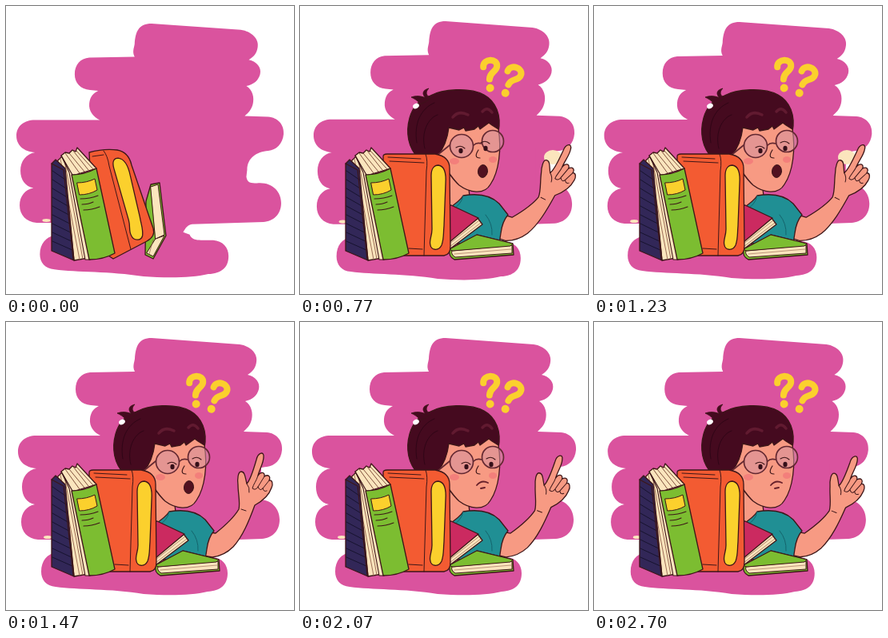
Animation, 360 px wide and 360 px high, one loop 2730 ms. Source, as an HTML page with a canvas:

```html
<!DOCTYPE html>
<html lang="en">
<head>
<meta charset="utf-8">
<title>Student with questions</title>
<style>
html, body { margin: 0; width: 100%; height: 100%; overflow: hidden; background: #fff; }
canvas { display: block; width: 360px; height: 360px; }
</style>
</head>
<body>
<canvas id="stage"></canvas>
<script>
const LOOP = 2730;
const canvas = document.getElementById('stage');
const ctx = canvas.getContext('2d');
const ratio = window.devicePixelRatio || 1;
canvas.width = canvas.height = 360 * ratio;

const INK = '#3d1618', PINK = '#da539e', CREAM = '#fbe5bd', SKIN = '#f79a83';
const GREEN = '#7cbd31', YELLOW = '#fbd02d', HAIR = '#450a1f', PAGE = '#91614c';

const paths = {};
function path(d) {
  return paths[d] || (paths[d] = new Path2D(d));
}
function shape(d, fill, width = 1.3, ink = INK) {
  ctx.fillStyle = fill;
  ctx.fill(path(d));
  if (width) line(d, width, ink);
}
function line(d, width = 1, ink = INK) {
  ctx.lineWidth = width;
  ctx.strokeStyle = ink;
  ctx.stroke(path(d));
}
function oval(x, y, rx, ry, fill, width = 0, turn = 0, ink = INK) {
  ctx.beginPath();
  ctx.ellipse(x, y, rx, ry, turn, 0, Math.PI * 2);
  ctx.fillStyle = fill;
  ctx.fill();
  if (width) {
    ctx.lineWidth = width;
    ctx.strokeStyle = ink;
    ctx.stroke();
  }
}
function group(draw) {
  ctx.save();
  draw();
  ctx.restore();
}
function pivot(x, y, degrees, scale = 1) {
  ctx.translate(x, y);
  ctx.rotate(degrees * Math.PI / 180);
  ctx.scale(scale, scale);
  ctx.translate(-x, -y);
}
// Eased value at time t from [time, value] pairs
function track(t, keys) {
  if (t <= keys[0][0]) return keys[0][1];
  for (let i = 1; i < keys.length; i++) {
    const [t0, a] = keys[i - 1], [t1, b] = keys[i];
    if (t < t1) {
      const k = (t - t0) / (t1 - t0);
      return a + (b - a) * k * k * (3 - 2 * k);
    }
  }
  return keys[keys.length - 1][1];
}

const blob = 'M182 20L292 28C306 30 315 40 313 50C312 58 308 62 302 66C312 68 318 76 316 84' +
  'C314 92 308 97 299 99C307 104 309 114 307 122C305 130 301 133 297 137L326 138' +
  'C338 139 346 148 345 160C344 172 336 180 326 181C312 182 300 190 300 205L299 214' +
  'C300 222 305 222 312 222C330 220 342 232 342 247C342 262 332 270 320 271L232 274' +
  'C226 275 224 279 221 284L229 287C231 293 237 294 243 294L258 294C270 295 277 303 277 314' +
  'C277 329 268 336 252 337C232 342 200 342 172 340C130 333 90 335 62 331C50 330 44 322 44 312' +
  'C44 298 52 290 62 288L60 272L40 272C27 271 19 262 19 250C19 238 26 230 36 228C26 226 20 218 20 206' +
  'C20 194 27 185 38 183C24 182 15 174 15 162C15 150 24 142 38 142L118 142' +
  'C110 138 104 131 105 121C106 112 110 108 116 105L106 104C94 103 87 95 87 84' +
  'C87 72 94 64 105 63L161 62C158 56 160 52 161 46C162 30 166 20 182 20Z';

function drawBlob(t) {
  const sx = track(t, [[0, 1.012], [370, .973], [770, .988], [900, 1.012], [1030, 1], [1290, 1.016],
    [1470, 1], [1850, 1.01], [2070, 1], [2400, 1.008], [2700, .987]]);
  const sy = track(t, [[0, .988], [370, .98], [770, 1.007], [1030, 1]]);
  group(() => {
    ctx.translate(180, 180);
    ctx.scale(sx, sy);
    ctx.translate(-180, -180);
    shape(blob, PINK, 0);
    oval(52, 269, 5, 2, CREAM);
    if (t > 500) {
      ctx.fillStyle = PINK;
      ctx.fillRect(296, 178, t > 1280 ? 23 : 17, 46);
    }
  });
  if (t > 200 && t < 1280) {
    const k = track(t, [[370, 0], [650, 1]]);
    oval(316, 201 - 12 * k, 18 - 7 * k, 21 - 12 * k, CREAM);
  }
}

function mark(x, y, turn) {
  group(() => {
    ctx.translate(x, y);
    ctx.rotate(turn);
    line('M-8 -9C-9 -20 10 -21 9 -10C8 -3 0 -3 0 6', 8, YELLOW);
    oval(1, 17, 5, 5, YELLOW);
  });
}
function drawMarks(t) {
  if (t < 250) return;
  group(() => {
    ctx.globalAlpha = track(t, [[250, 0], [370, .72], [520, 1]]);
    pivot(246, 113, track(t, [[250, 95], [370, 67], [600, 0]]), track(t, [[370, 1.1], [600, 1]]));
    mark(237, 85.5, .02);
    mark(263, 93, .44);
  });
}

function drawArm(t) {
  group(() => {
    pivot(262, 285, track(t, [[100, 14], [370, 10.5], [770, 8.4], [1030, 9.5], [1250, 8.4],
      [1470, 0], [2070, 2.9], [2700, 3.6]]));
    shape('M248 262L262 264C272 256 284 246 291 234C293 226 290 214 290 204C289 196 290 187 294 187' +
      'C299 187 299 195 301 202C305 198 309 186 313 172C315 163 323 161 322 169C322 176 317 184 315 192' +
      'C318 187 324 187 323 193C328 190 331 193 329 198C333 197 334 203 332 207C329 216 322 223 311 229' +
      'C304 248 296 268 284 281C276 289 266 293 258 294L246 292Z', SKIN);
    line('M315 192C313 199 309 203 308 208Q312 211 315 206L323 193M315 206Q317 212 321 208L329 198' +
      'M321 208Q322 213 326 211M301 202Q305 207 304 213M294 234L300 236', 1);
  });
}

function drawEyes(t) {
  const look = track(t, [[800, -7], [1000, 0]]);
  for (const [x, y, r, px] of [[202, 175, 14.5, 208], [241, 169, 13.5, 239]]) {
    oval(x, y, r, r, 'rgba(214,146,158,.55)', 1.7, 0, '#632831');
    oval(px + look, 181 - (x > 220 ? 3 : 0), 2.6, 3.2, '#351019');
    line(`M${px + look - 6} ${y + 2}Q${px + look} ${y - 2} ${px + look + 5} ${y + 3}`, 1.1);
  }
  line('M217 174Q221 170 227 172M187 174L171 187', 1.7, '#632831');
}

function drawBoy(t) {
  if (t < 60) return;
  group(() => {
    pivot(200, 297, 0, track(t, [[60, .15], [320, 1]]));
    drawArm(t);
    shape('M185 210L188 262L214 252L210 222Z', SKIN);
    shape('M184 254C192 249 200 244 204 237C222 234 238 236 249 247L260 261C254 268 252 276 251 284' +
      'L249 297L185 297Z', '#208f94');
    line('M204 237Q202 249 188 256M232 261Q241 272 240 286', 1, '#14646c');
    shape('M148 190C135 177 132 158 137 140C141 125 151 116 163 112C178 104 211 101 230 111' +
      'C245 119 252 137 248 157L235 176L180 196Z', HAIR);
    shape('M157 115C151 112 145 112 139 114C145 117 148 119 150 123C156 120 161 118 163 115' +
      'C158 112 156 108 161 103C153 105 152 110 157 115Z', HAIR, .8);
    oval(145, 125, 4, 3, '#fff', 0, -.5);
    shape('M186 152L199 155L205 152L207 156L218 154L223 150L225 154L236 146L240 149L248 154' +
      'C252 178 249 207 238 223C230 237 211 233 199 224C190 216 182 203 172 187C178 180 184 169 186 152Z', SKIN);
    line('M146 171C142 147 151 128 168 121M156 178C151 158 160 140 172 136', 1, '#2f0516');
    line('M191 139Q198 130 210 136M228 132Q234 125 240 133', 3.5, '#611a30');
    oval(193, 194, 6, 4, '#f37f7b');
    oval(241, 192, 5, 4, '#f37f7b');
    line('M223 180C219 186 219 190 225 190', 1.2);
    drawEyes(t);
    if (t < 1800) {
      const m = track(t, [[1640, 1], [1800, .3]]);
      oval(228.5, 206.5, 6 * m, 8 * m, '#521120', 1, .12);
    } else {
      line('M221 204Q227 197 235 201M226 208L231 207', 1.8, '#67202a');
    }
  });
}

function drawRedBook(t) {
  if (t < 150) return;
  group(() => {
    ctx.translate(track(t, [[150, -36], [320, 0]]), 0);
    shape('M222 265L228 273L187 304L186 294Z', CREAM);
    line('M224 268L187 297M226 271L187 301', .7, PAGE);
    shape('M189 249L223 265L187 295L178 293L178 250Z', '#cb2a60');
  });
}

function drawSmallBook(t) {
  if (t < 190) {
    group(() => {
      pivot(185, 316, track(t, [[30, 0], [190, 58]]));
      shape('M175 244L181 223L192 221L200 287L184 316L174 311Z', GREEN);
      shape('M187 291L198 287L184 313L176 309Z', CREAM, 1);
      shape('M181 226L190 223L198 286L187 291Z', CREAM, 1);
      line('M184 292L179 310', .7, PAGE);
    });
    return;
  }
  shape('M187 304L221 286L266 297L267 311L193 317Q185 313 187 304Z', GREEN);
  shape('M190 306L265 299L265 309L194 314Q188 310 190 306Z', CREAM, 1);
  line('M193 310L264 304', .6, PAGE);
  shape('M187 304L221 286L266 297L263 300L191 306Z', GREEN, 1);
}

function drawOrangeBook(t) {
  const tipped = t < 150;
  if (tipped) {
    shape('M104 183Q122 178 139 180C150 182 155 190 157 199L184 278Q187 288 176 294L134 316L110 300Z', '#f35b32');
    line('M122 181Q127 187 129 200L156 304M108 188L122 186', 1);
  } else {
    shape('M104 188Q104 185 109 185L169 185C181 187 187 193 187 203L188 300Q188 311 180 312L104 312Z', '#f35b32');
    line('M157 185Q160 193 158 206L155 312M110 189L151 191M112 194L155 196M136 303L153 304', 1);
  }
  group(() => {
    if (tipped) ctx.transform(1, 0, .263, .97, -85, -3);
    shape('M164 212C164 203 168 199 173 199C180 200 183 208 182 222L180 275C179 286 180 291 177 299' +
      'C173 307 164 305 163 299C161 293 165 288 165 279Z', YELLOW);
  });
}

function drawLeftBooks() {
  // Dark blue volume and its pages
  shape('M64 194L70 188L82 197L103 315L85 318L73 205Z', CREAM);
  line('M68 191L92 317M73 193L96 316M77 195L100 316', .9, PAGE);
  shape('M57 197L62 192L74 203L85 318L57 306Z', '#322758');
  for (let y = 206; y < 300; y += 11) {
    line(`M58 ${y}L${74 + (y - 206) * .1} ${y + 11}`, 1, '#17132f');
  }
  line('M57 197L72 205L84 317', 1.2);
  // Fanned pages above the green cover
  shape('M69 187L74 183L79 184L83 180L87 182L89 177L113 203L83 212Z', CREAM);
  line('M74 184L92 209M79 184L98 207M84 181L103 205M88 181L109 204', .9, '#71402e');
  shape('M69 187L83 211L105 317L99 317L79 208Z', CREAM, 1.1);
  shape('M82 211Q98 211 113 203L136 309Q122 317 104 317Z', GREEN);
  shape('M89 221Q101 221 111 216L114 230Q104 236 92 236Z', YELLOW, 1);
  line('M93 241Q105 241 115 237M95 248Q103 248 109 245M97 255Q107 255 117 251', 1.1);
}

function draw() {
  const t = performance.now() % LOOP;
  ctx.setTransform(ratio, 0, 0, ratio, 0, 0);
  ctx.fillStyle = '#fff';
  ctx.fillRect(0, 0, 360, 360);
  ctx.lineCap = ctx.lineJoin = 'round';
  drawBlob(t);
  drawMarks(t);
  drawBoy(t);
  drawRedBook(t);
  drawSmallBook(t);
  drawOrangeBook(t);
  drawLeftBooks();
  requestAnimationFrame(draw);
}
draw();
</script>
</body>
</html>
```
